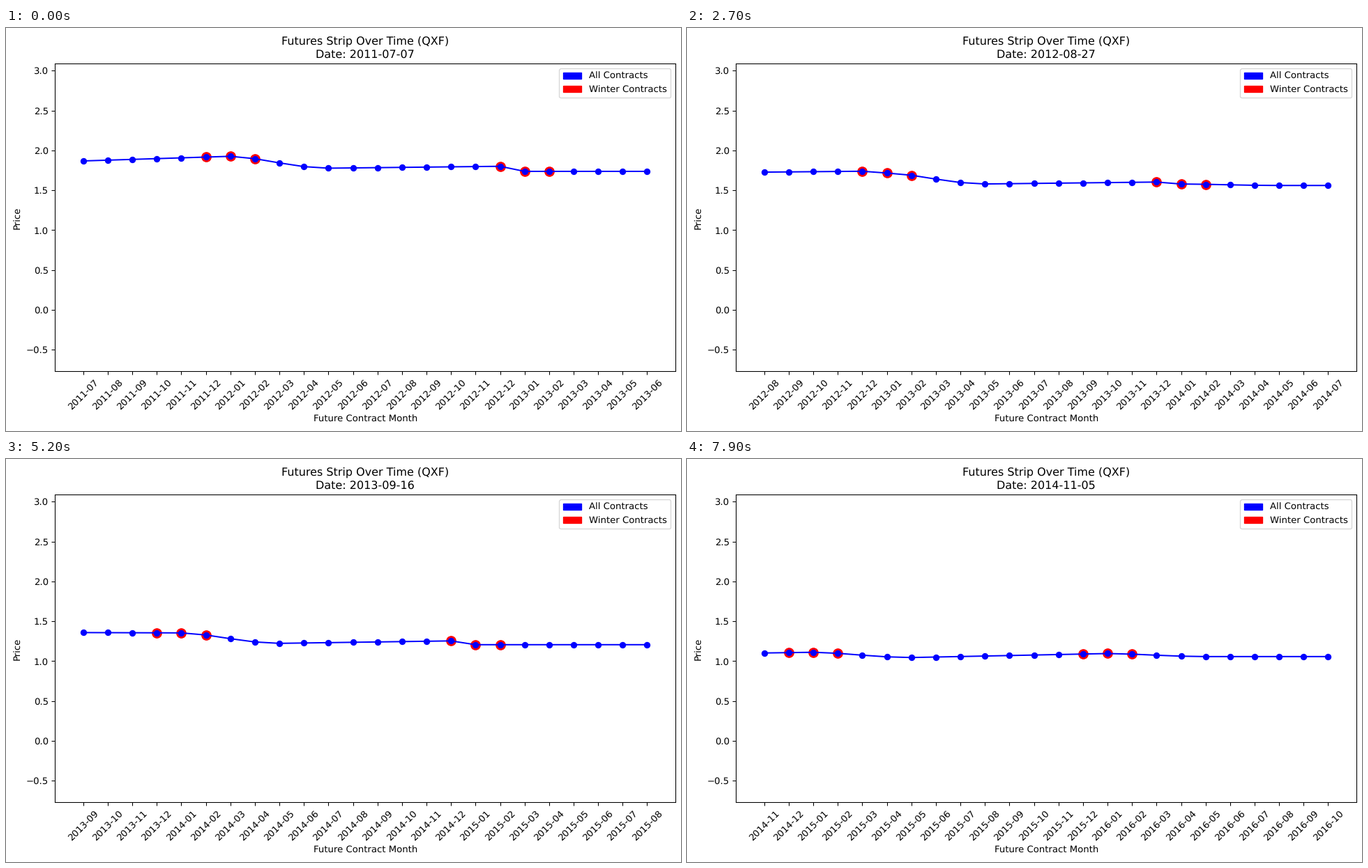
Recreate the animation shown at these times as a matplotlib script. Size 968 px wide and 579 px high, loop 8 s.

```python
import numpy as np
import matplotlib.pyplot as plt
from matplotlib.animation import FuncAnimation
from matplotlib.patches import Patch

W, H, DPI = 968, 579, 96
LEFT, RIGHT, TOP, BOTTOM = 70.4, 959.9, 51.4, 493.4
FRAMES, INTERVAL = 80, 100
STEP = 11  # business days per frame
COUNT = 24  # contracts in a strip
START = np.datetime64("2011-07-07")

# Key strips by frame number: front price, then winter peak and summer trough
# of each season, and the index from which the strip stays at the last trough.
STRIPS = {
    0: (1.868, 1.926, 1.777, 1.804, 1.737, 18),
    7: (1.808, 1.820, 1.606, 1.635, 1.543, 17),
    20: (1.698, 1.743, 1.620, 1.636, 1.580, 20),
    34: (1.740, 1.689, 1.538, 1.577, 1.540, 24),
    52: (1.358, 1.354, 1.223, 1.258, 1.206, 16),
    63: (1.245, 1.278, 1.216, 1.235, 1.242, 22),
    79: (1.102, 1.111, 1.045, 1.095, 1.057, 24),
}
KEYS = sorted(STRIPS)


def trade_date(frame):
    return np.busday_offset(START, frame * STEP)


def contract_months(frame):
    return trade_date(frame).astype("M8[M]") + np.arange(COUNT)


def spring(k):
    """Eased share of the January-to-May move after k months."""
    u = np.clip(k / 4, 0, 1) ** 0.9
    return u * u * (3 - 2 * u)


def strip_at(key, months):
    """Price of the given contracts on the strip stored under key."""
    front, peak1, trough1, peak2, trough2, tail = STRIPS[key]
    first = contract_months(key)[0]
    n = (months - first).astype(int)
    jan = -first.astype(int) % 12
    y = np.interp(n, [0, jan], [front, peak1])
    y += spring(n - jan) * (trough1 - peak1)
    y += np.interp(n, [jan + 4, jan + 12], [0, peak2 - trough1])
    y += spring(n - jan - 12) * (trough2 - peak2)
    return np.where(n >= tail, trough2, y)


def prices(frame, months):
    """Blend neighbouring strips contract by contract."""
    i = min(np.searchsorted(KEYS, frame, side="right"), len(KEYS) - 1)
    a, b = KEYS[i - 1], KEYS[i]
    w = (frame - a) / (b - a)
    return (1 - w) * strip_at(a, months) + w * strip_at(b, months)


plt.rcParams.update({"font.family": "DejaVu Sans", "font.size": 9.97,
                     "text.hinting": "none"})
fig = plt.figure(figsize=(W / DPI, H / DPI), dpi=DPI, facecolor="white")
ax = fig.add_axes([LEFT / W, 1 - BOTTOM / H, (RIGHT - LEFT) / W, (BOTTOM - TOP) / H])
x = np.arange(COUNT)


def draw(frame):
    months = contract_months(frame)
    y = prices(frame, months)
    winter = np.isin(months.astype(int) % 12, (11, 0, 1))

    ax.clear()
    ax.plot(x, y, "o-", color="blue")
    ax.scatter(x[winter], y[winter], s=100, color="red", zorder=1)
    ax.set_xlim(-0.05 * (COUNT - 1), 1.05 * (COUNT - 1))
    ax.set_ylim(-0.773, 3.087)
    ax.set_xticks(x, [str(m) for m in months], rotation=45)
    ax.set_title(f"Futures Strip Over Time (QXF)\nDate: {trade_date(frame)}",
                 linespacing=1.35)
    ax.set_xlabel("Future Contract Month")
    ax.set_ylabel("Price")
    ax.legend(handles=[Patch(color="blue", label="All Contracts"),
                       Patch(color="red", label="Winter Contracts")],
              loc="upper right")
    return []


anim = FuncAnimation(fig, draw, frames=FRAMES, interval=INTERVAL,
                     init_func=lambda: [], repeat=True, repeat_delay=0)
plt.show()
```
